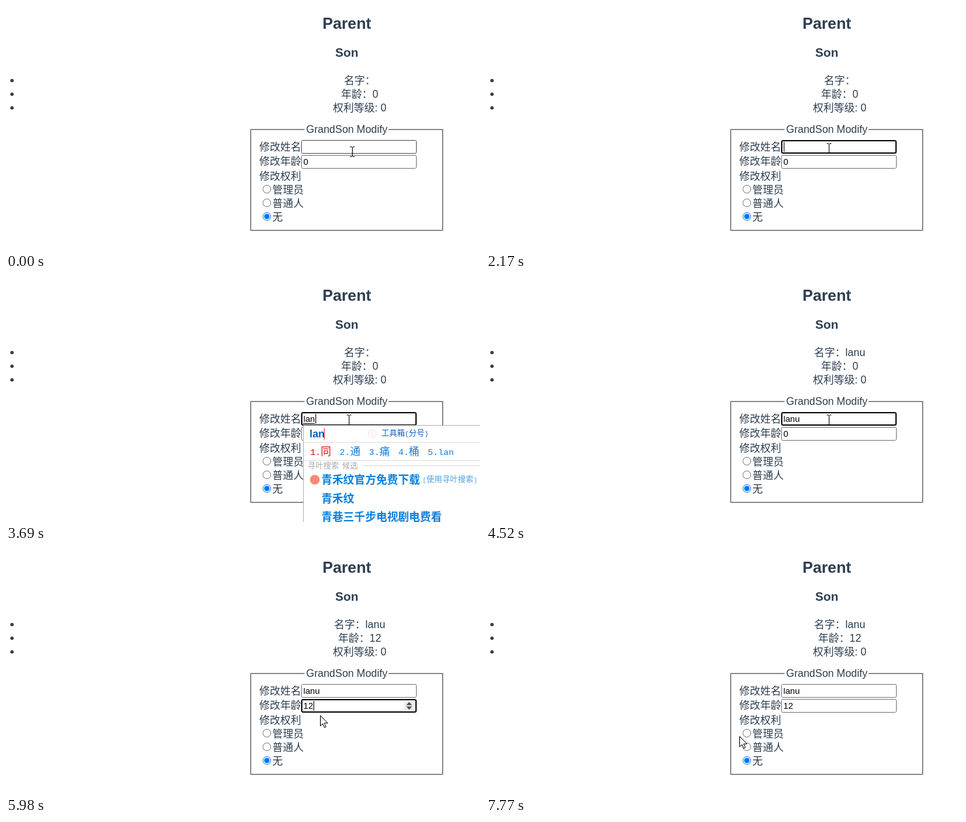
Write an HTML page that moves like this. It is 726x375 px and loops after 8 s.

```html
<!DOCTYPE html>
<html lang="zh-CN">
<head>
<meta charset="utf-8">
<style>
html, body { margin: 0; width: 100%; height: 100%; overflow: hidden; background: #fff; }
svg { display: block; white-space: pre; }
svg text { font-family: "Liberation Sans", "Noto Sans CJK SC", "Noto Sans CJK", sans-serif; }
.mono { font-family: "Liberation Mono", monospace; }
</style>
</head>
<body>
<svg id="stage" width="726" height="375" viewBox="0 0 726 375"></svg>
<script>
const LOOP = 8000, INK = '#2c3e50', BLUE = '#0b80de';
const stage = document.getElementById('stage');
const pen = document.createElement('canvas').getContext('2d');

// Last value whose start time has passed; rows are [start, ...values].
const at = (rows, t) => rows.filter(r => r[0] <= t).pop().slice(1);

// Pointer: start, shape, x, y
const POINTER = [
  [0, 'beam', 530, 224], [400, 'beam', 527, 220], [560, 'beam', 525, 219], [2600, 'beam', 525, 218],
  [4770, 'beam', 508, 219], [4890, 'beam', 480, 224], [5010, 'beam', 455, 226],
  [5150, 'beam', 462, 234], [5280, 'beam', 478, 239], [5430, 'beam', 466, 239], [5550, 'beam', 454, 239],
  [5700, 'none', 0, 0],
  [5980, 'arrow', 481, 254], [6100, 'arrow', 478, 258], [6220, 'arrow', 468, 264], [6340, 'arrow', 455, 270],
  [6460, 'arrow', 443, 275], [6580, 'arrow', 432, 279], [6700, 'arrow', 422, 281], [6850, 'arrow', 420, 287],
  [6970, 'arrow', 424, 292], [7120, 'arrow', 424, 297], [7280, 'arrow', 413, 285],
  [7650, 'arrow', 402, 290], [7770, 'arrow', 388, 286]
];
const TYPED = [[0, ''], [3120, 'la'], [3270, 'lan'], [4080, 'lanu']];
const AGE = [[0, '0'], [5700, '1'], [5830, '12']];
const FOCUS = [[0, ''], [1110, 'name'], [5280, 'age'], [6970, '']];
const CARET = [[0, 0], [1110, 1], [1640, 0], [2170, 1], [2750, 0], [3120, 1], [4520, 0], [5010, 1],
  [5550, 0], [5700, 1], [6340, 0], [6850, 1]];

const width = (s, size) => {
  pen.font = size + 'px "Liberation Sans"';
  return pen.measureText(s).width;
};
const text = (s, x, y, size = 16, fill = INK, extra = '') =>
  `<text x="${x}" y="${y}" font-size="${size}" fill="${fill}" ${extra}>${s}</text>`;
const mid = (s, x, y, size, extra = '') => text(s, x, y, size, INK, `text-anchor="middle" ${extra}`);
const rect = (x, y, w, h, fill, extra = '') =>
  `<rect x="${x}" y="${y}" width="${w}" height="${h}" fill="${fill}" ${extra}/>`;
const line = (d, color, w = 1) => `<path d="${d}" fill="none" stroke="${color}" stroke-width="${w}"/>`;
const circle = (x, y, r, fill, stroke = 'none') =>
  `<circle cx="${x}" cy="${y}" r="${r}" fill="${fill}" stroke="${stroke}"/>`;

// Half-width Latin beside full-width Chinese
const grid = (s, x, y, size, fill) => text(s.replace(/[ -~]+/g,
  m => `<tspan class="mono" font-size="${size / 1.2}">${m}</tspan>`), x, y, size, fill);

function field(y, value, focused, hover, caret) {
  const end = Math.round(456 + width(value, 13.333));
  return (focused
    ? rect(453, y + 1, 175, 19, '#fff', 'rx="2" stroke="#101010" stroke-width="2"')
    : rect(452.5, y + .5, 176, 20, '#fff', `rx="2" stroke="${hover ? '#4f4f4f' : '#767676'}"`)) +
    text(value, 455.5, y + 15, 13.333, '#000') +
    (focused && caret ? rect(end, y + 3, 1, 15, '#000') : '');
}

function radio(y, label, checked, hover) {
  const color = checked ? '#0075ff' : hover ? '#4f4f4f' : '#767676';
  return circle(399.5, y, 6, '#fff', color) + (checked ? circle(399.5, y, 4, color) : '') +
    text(label, 408, y + 6.5);
}

function page(t, name, age, focus, caret) {
  const shown = t < 3810 ? '' : name;
  let s = mid('Parent', 522, 35, 24, 'font-weight="bold"') + mid('Son', 522, 78, 18.72, 'font-weight="bold"');
  ['名字：' + shown, '年龄：' + age, '权利等级: 0'].forEach((row, i) => {
    s += circle(9.2, 114.5 + 21 * i, 2.6, INK) + mid(row, 541.7, 119.5 + 21 * i, 16);
  });
  // Grooved border: light inside at top left, light outside at bottom right
  s += line('M457.5 190.5H375.5V344.5M374.5 345.5H669.5V189.5', '#b4b4b4') +
    line('M457.5 189.5H374.5V345M375 344.5H668.5V190M586 189.5H669', '#6f6f6f') +
    line('M586 190.5H668', '#b4b4b4') + mid('GrandSon Modify', 522, 195, 16);
  ['修改姓名', '修改年龄', '修改权利'].forEach((label, i) => s += text(label, 388, 221.5 + 22.5 * i));
  s += field(206, name, focus == 'name', t < 1110, caret) + field(229, age, focus == 'age', false, caret);
  if (t >= 3120 && t < 3810) s += rect(455, 223, width(name, 13.333), 1, '#000');
  if (t >= 5550 && t < 5700) s += rect(455, 232, 8, 15, '#3297fd') + text('0', 455.5, 244, 13.333, '#fff');
  if (focus == 'age') s += rect(610, 232, 15, 15, '#efefef') +
    '<path d="M613 238.5l4.5-5 4.5 5zM613 240.5l4.5 5 4.5-5z" fill="#505050"/>';
  return s + radio(281.5, '管理员') + radio(302.5, '普通人', false, t >= 7120 && t < 7280) +
    radio(323.5, '无', true);
}

function inputPanel(t, typed) {
  if (t < 3120 || t >= 3810) return '';
  const full = t >= 3390, words = typed == 'la' ? '头投同通' : '同通痛桶';
  let s = rect(455.5, 226.5, 280, full ? 160 : 54, '#fff', 'stroke="#b4b4b4"') +
    line('M456 252.5H726', '#dcdcdc') +
    text(typed, 465, 245, 16, '#0a5fc4', 'font-weight="bold"') +
    rect(Math.round(466 + width(typed, 16)), 231, 1, 17, '#e03030');
  [...words, typed].forEach((w, i) => s += grid(`${i + 1}.${w}`, 466 + 45 * i, 272, 16, i ? BLUE : '#f00000'));
  if (!full) return s + rect(716, 229, 27, 27, '#ff9d85', 'rx="3"') +
    line('M700.5 262.5l-4 4.5 4 4.5', '#c8c8c8', 1.6) + line('M711 262.5l4.5 4.5-4.5 4.5', '#f8683c', 2);

  s += circle(561, 239, 6, '#fff', '#fbdcdc') + rect(560.5, 236, 1, 6, '#fbdcdc') +
    grid('工具箱(分号)', 575, 243, 12, '#0a5fc4') +
    line('M456 280.5H726', '#dcdcdc') +
    text('寻叶搜索', 462, 292.5, 12, '#a8a8a8') + text('候选', 515, 292.5, 12, '#a8a8a8') +
    line('M545 288.5H726', '#dcdcdc') + circle(473, 310, 7.5, '#f98a74');
  if (t >= 3540) {
    ['青禾纹官方免费下载', '青禾纹', '青巷三千步电视剧电费看'].forEach((row, i) =>
      s += text(row, 483, 316 + 28.5 * i, 16.8, BLUE, 'font-weight="bold"'));
    s += grid('(使用寻叶搜索)', 638, 314, 12, '#4a9fe4');
  }
  return s;
}

function pointer([shape, x, y]) {
  if (shape == 'none') return '';
  return `<g transform="translate(${x} ${y})">` + (shape == 'beam'
    ? line('M-3 -7.5H0M1 -7.5H4M.5 -7V7M-3 7.5H0M1 7.5H4', '#000')
    : '<path d="M.5 .5V16.5L4.2 13 6.7 18.8 9.2 17.7 6.7 12H11.8Z" fill="#fff" stroke="#000"/>') + '</g>';
}

let last = '';
function draw(now) {
  const t = now % LOOP;
  const [name] = at(TYPED, t), [age] = at(AGE, t), [focus] = at(FOCUS, t), [caret] = at(CARET, t);
  const view = page(t, name, age, focus, caret) + inputPanel(t, name) + pointer(at(POINTER, t));
  if (view != last) stage.innerHTML = last = view;
}

const start = performance.now();
function tick() {
  draw(performance.now() - start);
  requestAnimationFrame(tick);
}
tick();
</script>
</body>
</html>
```
